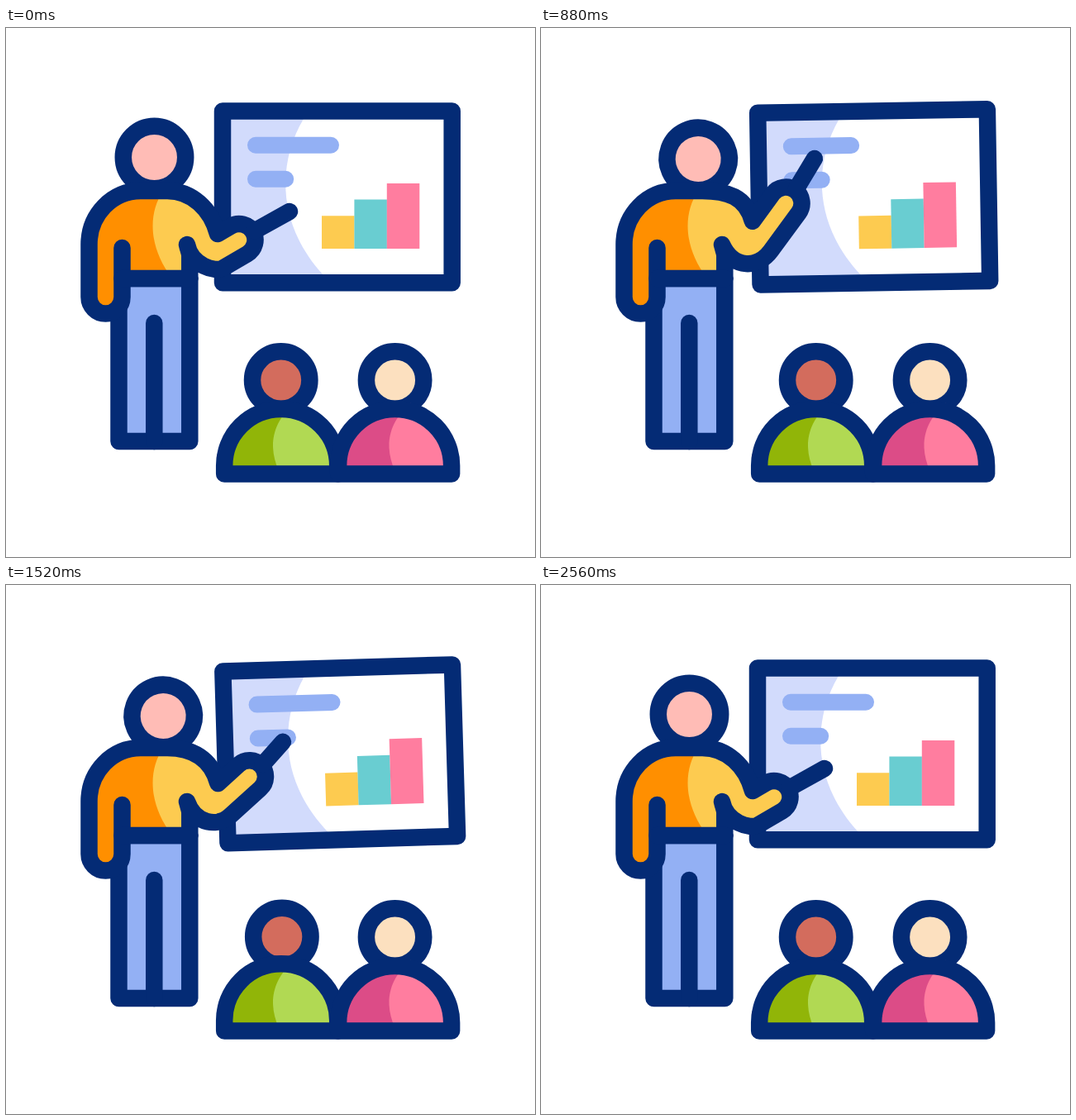
An HTML page for the animation above (2700 ms loop, 640 by 640 pixels).

```html
<!DOCTYPE html>
<html lang="en">
<head>
<meta charset="utf-8">
<title>Lesson</title>
<style>
  html, body { margin: 0; width: 100%; height: 100%; overflow: hidden; background: #fff; }
  svg { display: block; width: 100%; height: 100%; }
  .ink { stroke: #042b75; stroke-width: 20.5; stroke-linecap: round; stroke-linejoin: round; }
  .line { fill: none; }
  .text { stroke: #93b0f4; stroke-width: 20; stroke-linecap: round; }
</style>
</head>
<body>
<svg viewBox="0 0 640 640">
  <g id="board">
    <path d="M262 100H540V308H262Z" fill="#fff"/>
    <path d="M262 100H366L360 110C330 160 325 235 384 299L394 308H262Z" fill="#d2dbfc"/>
    <path id="text1" class="text"/>
    <path id="text2" class="text"/>
    <path id="bar0" fill="#fdcb50"/>
    <path id="bar1" fill="#69cdd1"/>
    <path id="bar2" fill="#ff7d9f"/>
    <path class="ink line" d="M262 100.5H539.7V308.2H262Z"/>
  </g>

  <circle id="head" class="ink" cx="179.5" cy="156.5" r="37.7" fill="#ffbcb6"/>
  <path class="ink" d="M136.5 303V500H222.3V303Z" fill="#93b0f4"/>
  <path class="ink line" d="M179.3 357V500"/>
  <path id="shirt" fill="#fdcb50"/>
  <path d="M190 197C171 226 173 266 201 303H140.5V325.5A20 20 0 0 1 100.5 325.5V262C100.5 226 128 197 163 197Z" fill="#ff8f00"/>
  <path id="outline" class="ink line"/>
  <path class="ink line" d="M140.5 303H222.3"/>
  <path id="stick" class="ink line"/>

  <g id="left">
    <circle class="ink" r="34.7" fill="#d36c5d"/>
    <path fill="#91b508"/><path fill="#b1d953"/><path class="ink line"/>
  </g>
  <g id="right">
    <circle class="ink" r="34.7" fill="#fce0bf"/>
    <path fill="#dc4c87"/><path fill="#ff7d9f"/><path class="ink line"/>
  </g>
</svg>
<script>
const LOOP = 2700;
const $ = id => document.getElementById(id);
const path = (el, d) => el.setAttribute('d', d);

// 0 before a, 1 after b, smooth between
function ease(t, a, b) {
  const u = Math.min(1, Math.max(0, (t - a) / (b - a)));
  return u * u * (3 - 2 * u);
}
const pulse = (t, a, b, c, d) => ease(t, a, b) - ease(t, c, d);

// Each pose is hand x, y and stick tip x, y
const rest = [282, 256.5, 343, 222];
const line1 = { from: [290.5, 208.5, 319, 156], to: [297.5, 213, 334, 158.5] };
const line2 = { from: [276, 228.3, 296, 191.3], to: [294.5, 231.8, 335, 189.8] };
const moves = [
  { start: 200, end: 560, pose: line1.from },
  { start: 740, end: 940, pose: line1.to },
  { start: 940, end: 1150, pose: line2.from },
  { start: 1150, end: 1520, pose: line2.to },
  { start: 1520, end: 1740, pose: rest }
];

function drawArm(t) {
  const [hx, hy, tx, ty] = moves.reduce(
    (now, { start, end, pose }) => now.map((v, i) => v + (pose[i] - v) * ease(t, start, end)), rest);
  // The elbow swings up and out as the hand lifts
  const lift = (rest[1] - hy) / 48, r = 19.5;
  const dx = hx - (252 + 11 * lift), dy = hy - (274 - 17 * lift);
  const len = Math.hypot(dx, dy), cos = dx / len, sin = dy / len;
  const at = (along, side) => [hx + along * cos - side * sin, hy + along * sin + side * cos];
  const bend = at(16 - len, -r);
  const d = `M140.5 266V325.5A20 20 0 0 1 100.5 325.5V262C100.5 226 128 197 163 197H195
    C225 197 ${bend[0] - 8} ${bend[1] - 30} ${bend}L${at(0, -r)}
    A${r} ${r} 0 0 1 ${at(0, r)}L${at(-len, r)}
    C${at(-len - 9 - 18 * lift, r)} ${224 + 10 * lift} ${288 + 5 * lift} 219 262
    L222.3 274V303`;
  path($('shirt'), d + 'H140.5Z');
  path($('outline'), d);
  path($('stick'), `M${at(22, 0)}L${tx} ${ty}`);
}

function drawBoard(t) {
  const turns = Math.min(2, Math.max(0, (t - 237) / 696));
  $('board').setAttribute('transform', `rotate(${2.05 * Math.sin(turns * 2 * Math.PI)} 400.8 90.5)`);
  path($('text1'), `M302 141.7H${393 - 89 * pulse(t, 520, 740, 740, 940)}`);
  path($('text2'), `M302 182.7H${338.2 - 36 * pulse(t, 940, 1150, 1150, 1360)}`);
  for (let i = 0; i < 3; i++) {
    const start = 1760 + i * 100, peak = start + 200;
    const h = (39.8 + 19.6 * i) * (1 + 0.26 * pulse(t, start, peak, peak, peak + 200));
    path($('bar' + i), `M${382 + i * 39.4} 267v${-h}h39.5v${h}Z`);
  }
}

// The body stretches first, then the head pops up and drops back before it
function drawListener(id, t, start, x, lean, shade) {
  const [head, dark, light, line] = $(id).children;
  const s = t - start;
  const body = pulse(s, 0, 150, 330, 560), hop = pulse(s, 60, 230, 230, 500);
  const y = 529.5 - 8 * body, r = 68.5;
  head.setAttribute('cx', x + lean * body);
  head.setAttribute('cy', 426 - 14 * hop);
  const shape = `M${x - r} 539.5V${y}A${r} ${r} 0 0 1 ${x + r} ${y}V539.5Z`;
  path(dark, shape);
  path(light, `M${x} ${y - r}A${r} ${r} 0 0 1 ${x + r} ${y}V539.5H${shade - 2}
    L${shade - 3} 535C${shade - 14} 510 ${shade - 14} 480 ${shade + 17} 453Z`);
  path(line, shape);
}

function draw(now) {
  const t = now % LOOP;
  drawBoard(t);
  drawArm(t);
  $('head').setAttribute('transform', `rotate(${20.5 * pulse(t, 400, 790, 2200, 2540)} 179.5 187)`);
  drawListener('left', t, 1050, 332.7, 3.5, 332.7);
  drawListener('right', t, 1990, 470.6, -4, 473.2);
}

const begin = performance.now();
function tick() {
  draw(performance.now() - begin);
  requestAnimationFrame(tick);
}
tick();
</script>
</body>
</html>
```
